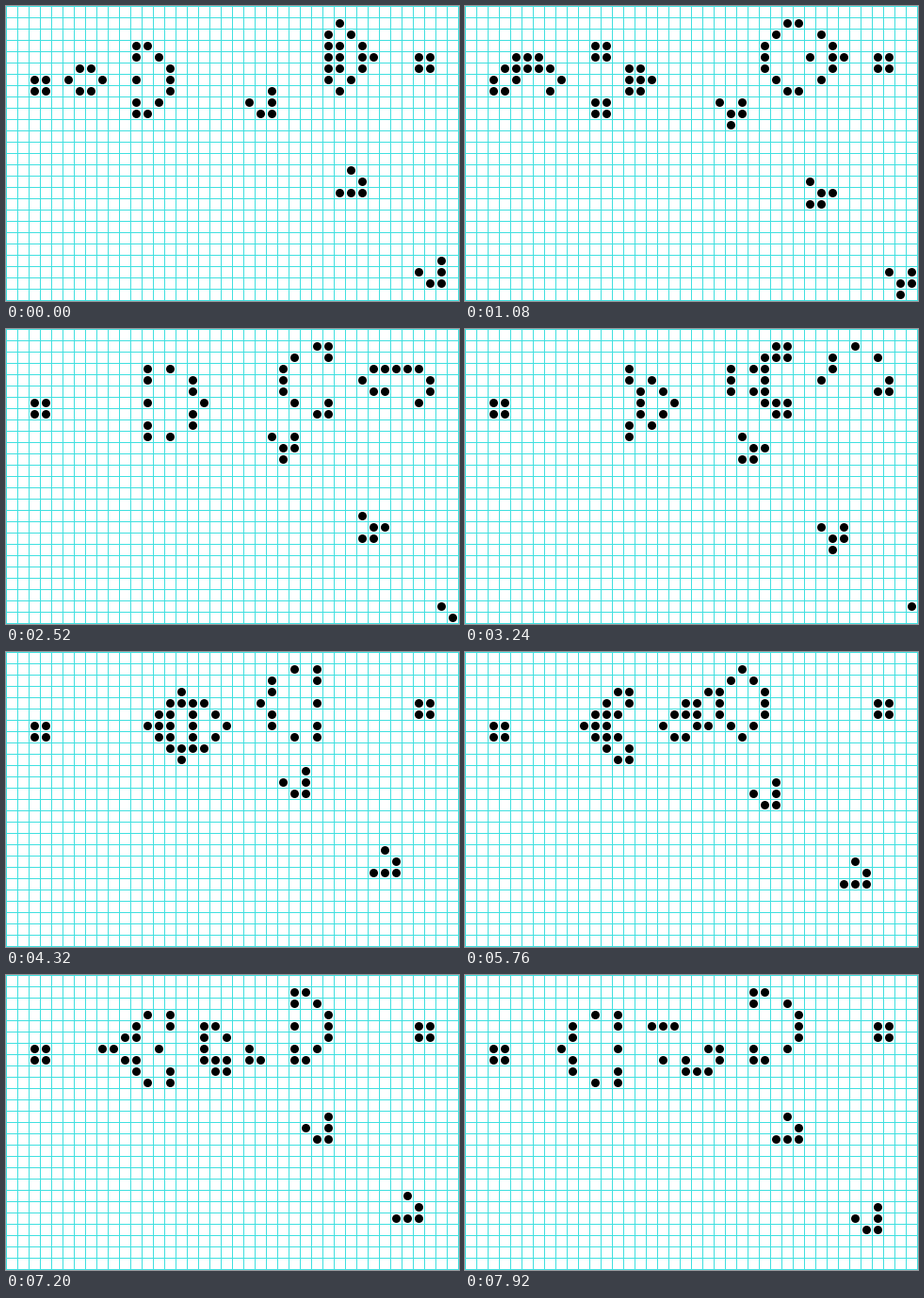
A matplotlib script that plays this animation: 481x313 px, repeating every 8 s.

```python
import numpy as np
import matplotlib.pyplot as plt
from matplotlib.animation import FuncAnimation
from matplotlib.collections import LineCollection, PatchCollection
from matplotlib.patches import Circle

W, H, DPI = 481, 313, 64
PX = 72 / DPI                 # one pixel in points
CELL, COLS, ROWS = 12, 40, 26
MARGIN = 12                   # hidden cells past the edges, so gliders fly out
WARMUP = 77                   # generations until three gliders are under way
STEP, TICK, LOOP = 360, 40, 8000


def glider_gun():
    grid = np.zeros((ROWS + MARGIN, COLS + MARGIN), int)
    left, right = 6, 4        # rows on which the two shuttles are mirrored
    grid[left:left + 2, 2:4] = 1
    grid[right:right + 2, 36:38] = 1
    for d in range(-3, 4):
        a = abs(d)
        grid[left + d, [12 + max(a - 1, 0), 18 - a * (a - 1) // 2]] = 1
        grid[right + d, [22, 23] if a < 2 else [22 + a if a == 2 else 26, 26]] = 1
    grid[left, [16, 19]] = 1
    return grid


def evolve(grid):
    near = sum(np.roll(grid, (dy, dx), (0, 1))
               for dy in (-1, 0, 1) for dx in (-1, 0, 1)) - grid
    return ((near == 3) | ((grid == 1) & (near == 2))).astype(int)


def discs(grid):
    cells = np.argwhere(grid[:ROWS, :COLS])
    return [Circle(((col + 0.5) * CELL + 0.5, (row + 0.5) * CELL + 0.5), 4.5)
            for row, col in cells]


grid = glider_gun()
for _ in range(WARMUP):
    grid = evolve(grid)

generations = []
for _ in range(LOOP // STEP + 1):
    generations.append(discs(grid))
    grid = evolve(grid)

fig = plt.figure(figsize=(W / DPI, H / DPI), dpi=DPI, facecolor="white")
ax = fig.add_axes([0, 0, 1, 1])
ax.set(xlim=(0, W), ylim=(H, 0))
ax.axis("off")

lines = [[(x + 0.5, 0), (x + 0.5, H)] for x in range(0, W, CELL)]
lines += [[(0, y + 0.5), (W, y + 0.5)] for y in range(0, H, CELL)]
ax.add_collection(LineCollection(lines, colors="#40e0e0", linewidths=PX,
                                 snap=False, zorder=1))
dots = ax.add_collection(PatchCollection(generations[0], facecolor="black",
                                         linewidth=0, zorder=2))


def draw(i):
    dots.set_paths(generations[i * TICK // STEP])
    return [dots]


anim = FuncAnimation(fig, draw, frames=LOOP // TICK, interval=TICK,
                     repeat=True, repeat_delay=0, blit=False)
plt.show()
```
